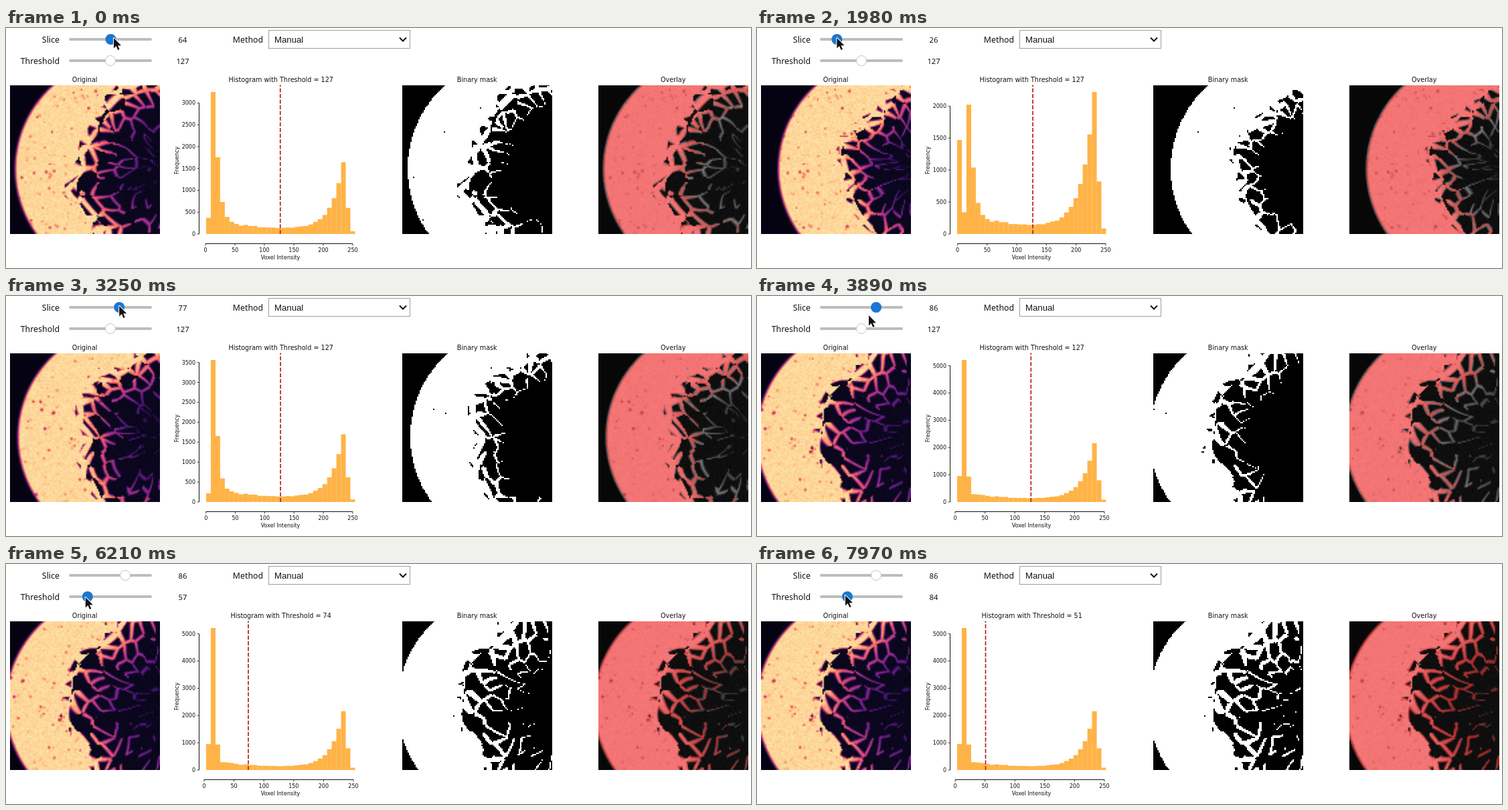
Animation of 1113x360 px, one loop 8 s. Source, as an HTML page with a canvas:

```html
<!DOCTYPE html>
<html lang="en">
<head>
<meta charset="utf-8">
<title>Slice viewer with threshold</title>
<style>
html, body { margin: 0; width: 100%; height: 100%; overflow: hidden; background: #fff; }
canvas { display: block; }
</style>
</head>
<body>
<canvas id="stage" width="1113" height="360"></canvas>
<script>
const LOOP = 8000, N = 112, BINS = 32, SIZE = 223.5, TOP = 85.5, BASE = 309;
const PLOT = '"DejaVu Sans", sans-serif', UI = '"Noto Sans", sans-serif';
const ctx = document.getElementById('stage').getContext('2d');

// Timelines of [ms, value]: shown slice, slider slice, slider threshold, applied threshold
const scan = [[300, 64], [1020, 41], [1740, 27], [1900, 27], [1980, 26], [2690, 28], [3250, 41], [3810, 86]];
const sliceKeys = [[300, 64], [1020, 36], [1740, 25], [1900, 25], [1980, 26], [2690, 42], [3250, 77], [3570, 86]];
const knobKeys = [[4690, 127], [6210, 57], [7090, 29], [7330, 29], [7970, 84]];
const limitKeys = [[4850, 127], [6210, 74], [7090, 29], [7330, 29], [7970, 51]];
const moveX = [[3650, 178], [3890, 167], [4300, 154]];
const tipY = [[80, 15], [3250, 15], [3650, 16], [3890, 29], [4300, 46], [6210, 50], [7970, 47]];

// How the scan changes with depth: one value for each listed slice
const depths = [26, 41, 64, 86];
const shape = {
  rim: [26, 12, 8, -6],
  marrow: [131, 150, 152, 165],
  zero: [299.5, 298.7, 298, 296],
  end: [521, 518, 518, 519],
  first: [1470, 220, 370, 950],
  low: [1720, 3220, 2910, 4870],
  tail: [.45, .42, .5, .13],
  high: [2123, 1600, 1545, 2060]
};

const mix = (a, b, u) => a + (b - a) * u;
const clamp = (v, lo = 0, hi = 1) => Math.max(lo, Math.min(hi, v));
const grey = v => `rgb(${v},${v},${v})`;

function at(t, keys) {
  if (t <= keys[0][0]) return keys[0][1];
  for (let i = 1; i < keys.length; i++) {
    const [a, va] = keys[i - 1], [b, vb] = keys[i];
    if (t <= b) return mix(va, vb, (t - a) / (b - a));
  }
  return keys[keys.length - 1][1];
}

const shapeAt = (z, name) => at(z, depths.map((d, i) => [d, shape[name][i]]));

function hash(i, j) {
  const s = Math.sin(i * 127.1 + j * 311.7) * 43758.5453;
  return s - Math.floor(s);
}

function square() {
  const c = document.createElement('canvas');
  c.width = c.height = N;
  return c.getContext('2d', { willReadFrequently: true });
}

// Speckled bone, repeated in x so that it can slide with the slice
function makeGrain() {
  const g = square();
  g.fillStyle = grey(234);
  g.fillRect(0, 0, N, N);
  for (let i = 0; i < 230; i++) {
    g.fillStyle = `rgba(70,70,70,${.1 + .7 * hash(i, 1) ** 3})`;
    g.beginPath();
    g.arc(hash(i, 2) * N, hash(i, 3) * N, .5 + hash(i, 4) * .7, 0, 7);
    g.fill();
  }
  const px = g.getImageData(0, 0, N, N).data;
  return Float32Array.from({ length: N * N }, (_, i) => px[i * 4] + 16 * (hash(i, 5) - .5));
}
const grain = makeGrain();

// Distance to the nearest wall in a drifting cell pattern, and an id for that wall
function cellWall(a, b, z) {
  let near = { d: 1e9 }, next = near;
  const ca = Math.floor(a), cb = Math.floor(b);
  for (let i = ca - 1; i <= ca + 1; i++) {
    for (let j = cb - 1; j <= cb + 1; j++) {
      const h = hash(i, j), k = hash(j + 9, i);
      const x = i + .5 + .42 * Math.sin(6.28 * h + z * .06);
      const y = j + .5 + .42 * Math.sin(6.28 * k + z * .05);
      const c = { x, y, h, d: (x - a) ** 2 + (y - b) ** 2 };
      if (c.d < near.d) [next, near] = [near, c];
      else if (c.d < next.d) next = c;
    }
  }
  const gap = (next.d - near.d) / 2 / Math.hypot(next.x - near.x, next.y - near.y);
  return [gap, hash(near.h + next.h, 3)];
}

// Bone: a disc whose inside opens into cells with ever thinner, fainter walls
function makeField(z) {
  const left = shapeAt(z, 'rim'), radius = shapeAt(z, 'marrow'), slide = Math.round(z * 3);
  return Float32Array.from({ length: N * N }, (_, i) => {
    const col = i % N, row = Math.floor(i / N), x = col * 2 + 1, y = row * 2 + 1;
    const rim = clamp((168 - Math.hypot(x - left - 168, y - 126)) / 5 + .5);
    const bone = mix(7, grain[row * N + (col + slide) % N], rim);
    const wx = x + 4 * Math.sin(y / 13 + z * .03), wy = y + 4 * Math.sin(x / 15);
    const angle = Math.atan2(wy - 130, 245 - wx);
    const deep = radius - Math.hypot(245 - wx, wy - 130) + 7 * Math.sin(angle * 5 + z * .1);
    if (deep < -4) return bone;
    const [gap, id] = cellWall(angle * 6.2, 5 * Math.log(1 + deep / 70), z);
    const half = 1.7 + 7 * Math.exp(-Math.max(0, deep) / 17);
    const kept = deep < 14 || id > .08 + deep / 170;
    const wall = kept ? clamp((half - gap * (16 + deep * .1)) / 3 + .5) : 0;
    const glow = Math.exp(-Math.max(0, deep - 15) / (40 + z * .35));
    return mix(11 + 7 * hash(i, 6), bone, wall * glow);
  });
}

// Frequencies: a dark spike, a falling floor and a rise to the bone peak
function makeHist(z) {
  const [first, low, tail, high] = ['first', 'low', 'tail', 'high'].map(k => shapeAt(z, k));
  const peak = z < 34 ? 2 : 1;
  return Array.from({ length: BINS }, (_, i) => {
    if (!i) return first;
    const ripple = 1 + .2 * (hash(i, 7) - .5);
    const spike = i < peak ? 0 : low * tail ** ((i - peak) ** 1.4);
    const rise = i < 30 ? Math.exp((i - 29) / 2.6) : Math.exp(-.95 * (i - 29) ** 1.75);
    const floor = i < 30 ? (100 + 250 * Math.exp(-i / 8)) * ripple : 0;
    return floor + spike + high * rise;
  });
}

const stops = [[0, 0, 4], [24, 15, 61], [81, 18, 124], [131, 38, 129], [183, 55, 121],
  [231, 82, 99], [252, 137, 97], [254, 196, 136], [252, 253, 191]];
const magma = Array.from({ length: 256 }, (_, v) => {
  const p = v / 255 * 8, i = Math.min(7, Math.floor(p));
  return stops[i].map((c, j) => mix(c, stops[i + 1][j], p - i));
});

const views = [6, 592, 885].map(x => {
  const g = square();
  return { x, g, img: g.createImageData(N, N) };
});

let field, fieldZ;
function drawViews(z, limit) {
  if (z !== fieldZ) field = makeField(fieldZ = z);
  field.forEach((f, i) => {
    const v = clamp(Math.round(f), 0, 255), on = v > limit;
    const over = on ? [v / 2 + 127, v / 2, v / 2] : [v, v, v];
    [magma[v], Array(3).fill(on ? 255 : 0), over].forEach((c, k) =>
      views[k].img.data.set([...c, 255], i * 4));
  });
  views.forEach(({ x, g, img }, k) => {
    g.putImageData(img, 0, 0);
    ctx.imageSmoothingEnabled = k !== 1;
    ctx.drawImage(g.canvas, x, TOP, SIZE, SIZE);
  });
}

function text(str, x, y, font, align = 'center') {
  ctx.font = font;
  ctx.textAlign = align;
  ctx.fillStyle = '#111';
  ctx.fillText(str, x, y);
}

function line(points, style, width) {
  ctx.beginPath();
  points.forEach(([x, y]) => ctx.lineTo(x, y));
  ctx.strokeStyle = style;
  ctx.lineWidth = width;
  ctx.stroke();
}

function drawHistogram(z, limit) {
  const hist = makeHist(z), x0 = shapeAt(z, 'zero'), end = shapeAt(z, 'end');
  const max = Math.max(...hist), scale = 213 / max, w = 6.95;
  const toX = v => mix(x0, end, v / 250);
  ctx.fillStyle = '#ffb347';
  hist.forEach((n, i) => ctx.fillRect(299 + i * w, BASE - n * scale, w + .1, n * scale));

  ctx.setLineDash([5.9, 2.6]);
  line([[toX(limit), BASE], [toX(limit), TOP]], '#b5201c', 1.7);
  ctx.setLineDash([]);

  const step = max > 4000 ? 1000 : 500, last = Math.floor(max / step) * step;
  line([[288.5, BASE], [288.5, BASE - last * scale]], '#111', 1);
  for (let n = 0; n <= last; n += step) {
    const y = BASE - n * scale;
    line([[285.5, y], [288.5, y]], '#111', .8);
    text(n, 283, y + 3, '8px ' + PLOT, 'right');
  }
  line([[x0, 323.5], [end, 323.5]], '#111', 1);
  for (let v = 0; v <= 250; v += 50) {
    line([[toX(v), 323.5], [toX(v), 326.5]], '#111', .8);
    text(v, toX(v), 335.5, '8px ' + PLOT);
  }
  text('Voxel Intensity', 410, 347, '8px ' + PLOT);
  ctx.save();
  ctx.translate(258, 198.5);
  ctx.rotate(-Math.PI / 2);
  text('Frequency', 0, 0, '8px ' + PLOT);
  ctx.restore();
}

function drawSlider(label, value, x, y, active) {
  text(label, 80, y + 4.5, '12.4px ' + UI, 'right');
  text(value, 264, y + 4.5, '11.2px ' + UI);
  ctx.fillStyle = '#bdbdbd';
  ctx.beginPath();
  ctx.roundRect(94, y - 2, 124, 4, 2);
  ctx.fill();
  ctx.beginPath();
  ctx.arc(x, y, active ? 8 : 7.5, 0, 7);
  ctx.fillStyle = active ? '#1976d2' : '#fff';
  ctx.fill();
  if (!active) {
    ctx.strokeStyle = '#c4c4c4';
    ctx.lineWidth = 1;
    ctx.stroke();
  }
}

function drawSelect() {
  text('Method', 384, 21.5, '12.3px ' + UI, 'right');
  ctx.strokeStyle = '#9e9e9e';
  ctx.lineWidth = 1;
  ctx.strokeRect(392.5, 3.5, 211, 27);
  text('Manual', 401, 22, '13.2px "Liberation Sans", sans-serif', 'left');
  line([[588, 14.5], [593, 19.5], [598, 14.5]], '#111', 2);
}

const arrow = new Path2D('M0 0V15.5L3.6 12.1 6.2 18 8.6 17 6 11.2H11Z');
function drawCursor(x, y) {
  ctx.save();
  ctx.translate(x, y);
  ctx.lineJoin = 'round';
  ctx.strokeStyle = '#fff';
  ctx.lineWidth = 2;
  ctx.stroke(arrow);
  ctx.fillStyle = '#111';
  ctx.fill(arrow);
  ctx.restore();
}

function draw(now) {
  const time = now % LOOP, shift = time < 2690 ? 60 : 50;
  const t = Math.max(0, Math.floor((time - shift) / 80) * 80 + shift);
  ctx.fillStyle = '#fff';
  ctx.fillRect(0, 0, 1113, 360);

  const z = at(t, scan), limit = Math.round(at(t, limitKeys));
  drawViews(z, limit);
  drawHistogram(z, limit);
  ['Original', 'Histogram with Threshold = ' + limit, 'Binary mask', 'Overlay'].forEach((s, k) =>
    text(s, 117.7 + k * 293, 81, '9.64px ' + PLOT));

  const slice = Math.round(at(t, sliceKeys)), level = Math.round(at(t, knobKeys));
  const sliceX = 94 + slice * .977, levelX = 94 + level * .488, onLevel = t >= 4690;
  drawSlider('Slice', slice, sliceX, 17, !onLevel);
  drawSlider('Threshold', level, levelX, 49, onLevel);
  drawSelect();
  const tipX = onLevel ? levelX - 3 : t > 3650 ? at(t, moveX) : t < 80 ? 161 : sliceX;
  drawCursor(tipX, at(t, tipY));
}

function tick(now) {
  draw(now);
  requestAnimationFrame(tick);
}
tick(0);
</script>
</body>
</html>
```
